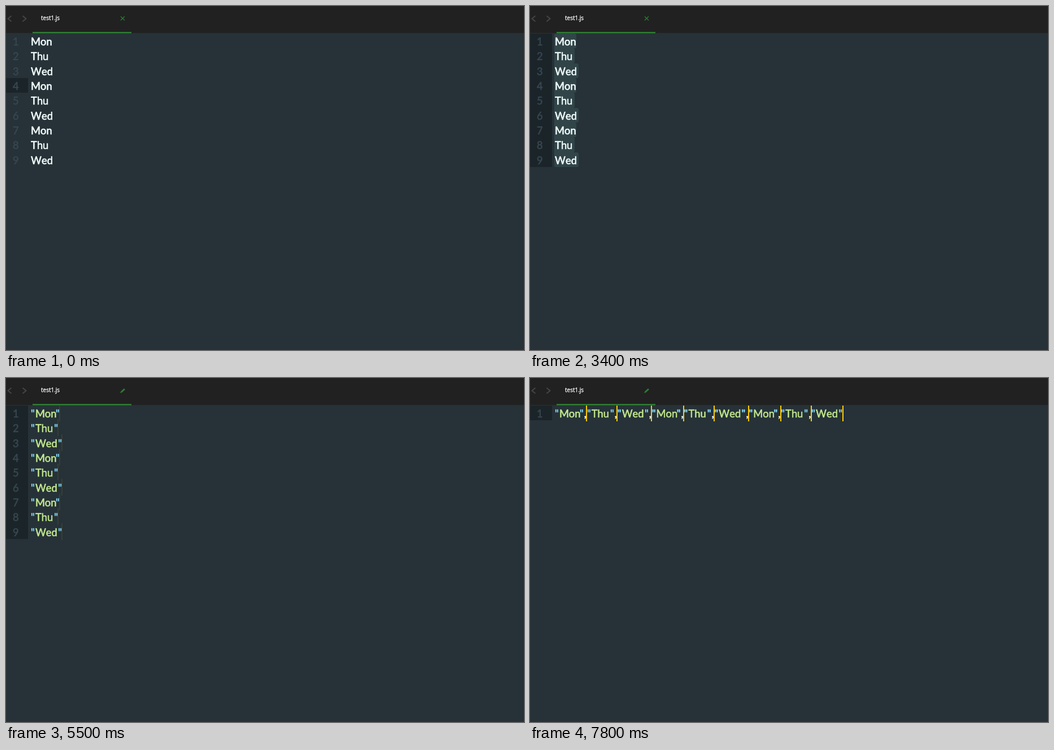
These frames come from a looping animation (917x611 px, 8000 ms). An HTML page with a canvas:

```html
<!DOCTYPE html>
<html lang="en">
<head>
<meta charset="utf-8">
<title>Multiple carets</title>
<style>
  html, body { margin: 0; width: 100%; height: 100%; overflow: hidden; background: #263238; }
  canvas { display: block; }
</style>
</head>
<body>
<canvas id="stage" width="917" height="611"></canvas>
<script>
const ctx = document.getElementById("stage").getContext("2d");
const LOOP = 8000;
const BAR = 48, TOP = 49, ROW = 26.33, LEFT = 44.1, QUOTE = 7.8, COMMA = 5.1;
const ADVANCE = { Mon: 36.1, Thu: 33.25, Wed: 40.25 };
const words = Array.from({ length: 9 }, (_, i) => ["Mon", "Thu", "Wed"][i % 3]);
const allRows = words.map((_, i) => i);
const CODE_FONT = "18.3px Lato, sans-serif";
const color = {
  bar: "#212121", page: "#263238", gutter: "#1b2429",
  number: "#37474f", plain: "#f4ffff", quote: "#89ddff", string: "#c3e88d",
  selection: "#314549", caret: "#ffcc00", green: "#2e7d32", arrow: "#454545"
};

// Each step overrides the properties it names; "alpha" is the caret opacity.
const steps = [
  [0, { rows: [3], caret: "none", alpha: 0, select: "none", quoted: false, commas: false, joined: false }],
  [900, { rows: [4], caret: "click", alpha: 1 }],
  [1300, { rows: [8], caret: "last", select: "lines" }],
  [1600, { alpha: 0.6 }], [1700, { alpha: 0.2 }], [1800, { alpha: 0 }],
  [2300, { alpha: 1 }],
  [2700, { alpha: 0.4 }], [2800, { alpha: 0 }],
  [2900, { rows: allRows, caret: "word", alpha: 1, select: "words" }],
  [3200, { alpha: 0.6 }], [3300, { alpha: 0.2 }], [3400, { alpha: 0 }],
  [3800, { alpha: 0.5 }], [3900, { alpha: 1 }],
  [4000, { quoted: true }],
  [4400, { alpha: 0.4 }], [4500, { alpha: 0 }],
  [4700, { select: "none", alpha: 1 }],
  [5000, { alpha: 0.6 }],
  [5100, { caret: "quote", alpha: 1 }],
  [5400, { alpha: 0.5 }], [5500, { alpha: 0.08 }],
  [5900, { commas: true, caret: "comma", alpha: 1 }],
  [6200, { alpha: 0.6 }], [6300, { alpha: 0.2 }],
  [6400, { rows: allRows.slice(1), caret: "next", alpha: 1 }],
  [6800, { rows: [0], joined: true, caret: "joined" }],
  [7100, { alpha: 0.4 }], [7300, { alpha: 0 }],
  [7800, { alpha: 1 }]
];

const stateAt = time => Object.assign({}, ...steps.filter(s => s[0] <= time).map(s => s[1]));
const rowTop = i => Math.round(TOP + ROW * i);

function fillRect(fill, x, y, w, h) {
  ctx.fillStyle = fill;
  ctx.fillRect(x, y, w, h);
}

// A thin outline gives the letters a medium weight.
function write(text, x, y, fill, outline = 0.6) {
  ctx.fillStyle = ctx.strokeStyle = fill;
  ctx.lineWidth = outline;
  ctx.lineJoin = "round";
  ctx.fillText(text, x, y);
  ctx.strokeText(text, x, y);
}

function strokeLines(stroke, width, ...lines) {
  ctx.strokeStyle = stroke;
  ctx.lineWidth = width;
  ctx.lineJoin = "miter";
  ctx.beginPath();
  for (const [start, ...rest] of lines) {
    ctx.moveTo(...start);
    rest.forEach(p => ctx.lineTo(...p));
  }
  ctx.stroke();
}

// Places every word and returns the x of each stop a caret can rest on.
function layout(state) {
  let x = LEFT;
  return words.map((word, i) => {
    const row = state.joined ? 0 : i;
    const start = state.joined ? x : LEFT;
    const wordStart = start + (state.quoted ? QUOTE : 0);
    const wordEnd = wordStart + ADVANCE[word];
    const quoteEnd = wordEnd + (state.quoted ? QUOTE : 0);
    const hasComma = state.commas && !(state.joined && i === words.length - 1);
    const end = quoteEnd + (hasComma ? COMMA : 0);
    x = end;
    return { word, row, start, wordStart, wordEnd, quoteEnd, hasComma, end };
  });
}

function drawBar(modified) {
  fillRect(color.bar, 0, 0, 917, BAR);
  strokeLines(color.arrow, 2,
    [[9.5, 17.5], [3.5, 22.5], [9.5, 27.5]],
    [[29.5, 17.5], [35.5, 22.5], [29.5, 27.5]]);
  ctx.font = "10px 'Open Sans', sans-serif";
  write("test1.js", 62, 25, "#ffffff", 0.3);
  fillRect(color.green, 47, 46, 175, 2.5);
  if (modified) {
    strokeLines(color.green, 3, [[204, 25], [210, 19.5]]);
    strokeLines(color.green, 1.5, [[202.5, 26.5], [205, 24]]);
  } else {
    strokeLines(color.green, 1.3, [[203, 18.5], [210, 25.5]], [[210, 18.5], [203, 25.5]]);
  }
}

function drawGutter(state) {
  for (const i of state.rows) {
    fillRect(color.gutter, 0, rowTop(i), 39, rowTop(i + 1) - rowTop(i));
  }
  ctx.font = CODE_FONT;
  ctx.textAlign = "center";
  const count = state.joined ? 1 : words.length;
  for (let i = 0; i < count; i++) write(i + 1, 17.2, rowTop(i) + 20.5, color.number);
  ctx.textAlign = "left";
}

function drawSelection(state, items) {
  if (state.select === "none") return;
  ctx.fillStyle = color.selection;
  items.forEach((item, i) => {
    const newline = state.select === "lines" && i < words.length - 1;
    const left = Math.floor(item.wordStart) - 1;
    const right = Math.round(item.wordEnd + (newline ? 6.4 : 1.4));
    ctx.beginPath();
    ctx.roundRect(left, rowTop(i), right - left, rowTop(i + 1) - rowTop(i), [i ? 0 : 3, 3, 3, i < 8 ? 0 : 3]);
    ctx.fill();
  });
}

function drawText(state, items) {
  ctx.font = CODE_FONT;
  for (const item of items) {
    const y = rowTop(item.row) + 20.5;
    write(item.word, item.wordStart, y, state.quoted ? color.string : color.plain);
    if (state.quoted) {
      write('"', item.start, y, color.quote);
      write('"', item.wordEnd, y, color.quote);
    }
    if (item.hasComma) write(",", item.quoteEnd, y, color.plain);
  }
}

function caretStops(mode, items) {
  const at = key => items.map(item => [item[key], item.row]);
  const last = items[items.length - 1];
  switch (mode) {
    case "click": return [[items[4].wordEnd, 4]];
    case "last": return [[last.wordEnd, last.row]];
    case "word": return at("wordEnd");
    case "quote": return at("quoteEnd");
    case "comma":
    case "joined": return at("end");
    case "next": return [...at("start").slice(1), [last.end, last.row]];
    default: return [];
  }
}

function drawCarets(state, items) {
  ctx.globalAlpha = state.alpha;
  for (const [x, row] of caretStops(state.caret, items)) {
    const top = Math.max(TOP, rowTop(row) - 2);
    fillRect(color.caret, Math.floor(x) - 1, top, 2, rowTop(row) + 28 - top);
  }
  ctx.globalAlpha = 1;
}

function draw(time) {
  const state = stateAt(time);
  const items = layout(state);
  fillRect(color.page, 0, 0, 917, 611);
  drawBar(state.quoted);
  drawGutter(state);
  drawSelection(state, items);
  drawText(state, items);
  drawCarets(state, items);
}

ctx.fontKerning = "none";
const begin = performance.now();
function tick() {
  draw((performance.now() - begin) % LOOP);
  requestAnimationFrame(tick);
}
tick();
</script>
</body>
</html>
```
